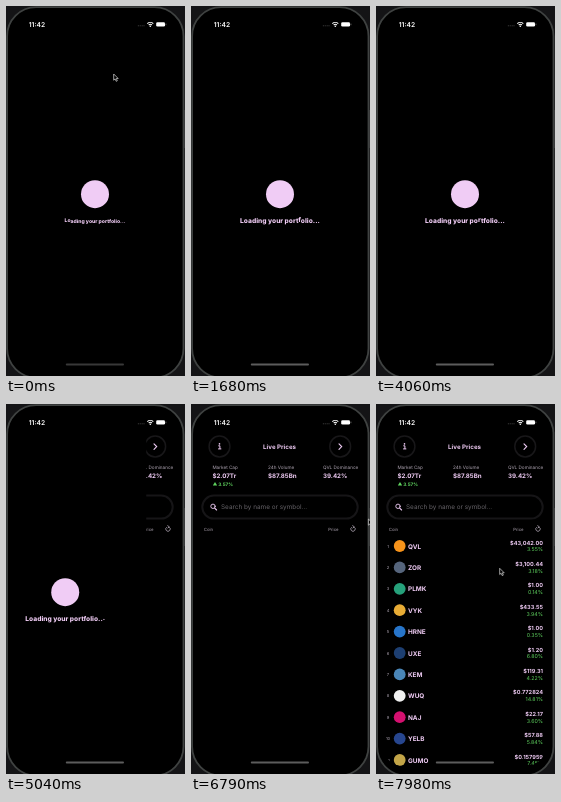
These frames come from a looping animation (179 px wide and 370 px high, 8 s). An HTML page:

```html
<!DOCTYPE html>
<html lang="en">
<head>
<meta charset="utf-8">
<title>Live Prices</title>
<style>
  html, body { margin: 0; width: 100%; height: 100%; overflow: hidden; background: #000; }
  svg { display: block; width: 100vw; height: 100vh; }
  text { font-family: Inter, "Open Sans", sans-serif; text-rendering: geometricPrecision; }
</style>
</head>
<body>
<svg id="stage" viewBox="0 0 179 370" xmlns="http://www.w3.org/2000/svg"></svg>
<script>
const LOOP = 8000;
const ACCENT = '#f0ccf5', GREY = '#b0a6b4', GREEN = '#5fd35f';
const SCREEN = { x: 7, right: 170, bottom: 362 };

// Loading wave: one letter lifts per step, two passes, then the cover slides away
const MESSAGE = 'Loading your portfolio...';
const WAVE_START = -224, STEP = 104, LIFT = 2.2;
const SLIDE_START = WAVE_START + 2 * MESSAGE.length * STEP;
const ROWS_AT = 7300, ICONS_AT = 7840, ICON_GAP = 70;

const COINS = [
  ['QVL', '$43,042.00', '3.55%', '#f7931a'],
  ['ZOR', '$3,100.44', '3.18%', '#56657c'],
  ['PLMK', '$1.00', '0.14%', '#26a17b'],
  ['VYK', '$433.55', '3.94%', '#e8ac35'],
  ['HRNE', '$1.00', '0.35%', '#2775ca'],
  ['UXE', '$1.20', '6.80%', '#1d3f72'],
  ['KEM', '$119.31', '4.22%', '#4a86b8'],
  ['WUQ', '$0.772824', '14.81%', '#f0f0f0'],
  ['NAJ', '$22.17', '3.60%', '#d4106f'],
  ['YELB', '$57.88', '5.84%', '#27468f'],
  ['GUMO', '$0.157959', '7.45%', '#c3a548']
];

const label = (x, y, size, str, fill, weight = 400, anchor = 'start', id = '') =>
  `<text ${id && `id="${id}"`} x="${x}" y="${y}" font-size="${size}" fill="${fill}"
    font-weight="${weight}" text-anchor="${anchor}">${str}</text>`;

const stat = (x, title, value) =>
  label(x, 65.2, 4.65, title, GREY) + label(x, 74.4, 6.2, value, ACCENT, 700);

const ring = (x, y) =>
  `<circle cx="${x}" cy="${y}" r="10.4" fill="#000" stroke="#181719" stroke-width="1.5"/>`;

const row = ([name, price, change, color], i) => {
  const y = 142 + 21.4 * i;
  return label(12, y + 1.5, 4.1, i + 1, GREY, 400, 'middle')
    + `<circle class="icon" cx="23.7" cy="${y}" r="5.9" fill="${color}"/>`
    + label(32, y + 2.5, 6.4, name, ACCENT, 700)
    + label(167, y - 1.4, 5.6, price, ACCENT, 700, 'end')
    + label(167, y + 5.4, 5.3, change, GREEN, 400, 'end');
};

const phone = `
  <rect width="179" height="370" fill="#141416"/>
  <path d="M178.6 104V142" stroke="#3a3a3a"/>
  <rect x="1.1" y="1.2" width="176.4" height="370.4" rx="29" fill="#000" stroke="#3f4241" stroke-width="1.8"/>`;

const home = `
  ${ring(28.5, 42.5)}
  <path d="M27.3 41.8H28.9V44.8M27.1 44.9H30.3" fill="none" stroke="${ACCENT}" stroke-width="1"/>
  <circle cx="28.5" cy="39.9" r=".8" fill="${ACCENT}"/>
  ${label(88.6, 45, 6.2, 'Live Prices', ACCENT, 700, 'middle')}
  ${ring(149.2, 42.5)}
  <path d="M148 39.8L150.7 42.6L148 45.4" fill="none" stroke="${ACCENT}" stroke-width="1.1" stroke-linecap="round"/>
  ${stat(21.4, 'Market Cap', '$2.07Tr')}
  ${stat(77, '24h Volume', '$87.85Bn')}
  ${stat(132, 'QVL Dominance', '39.42%')}
  <path d="M21.8 81.6L24 77.9L26.2 81.6Z" fill="${GREEN}"/>
  ${label(27.2, 81.7, 4.7, '3.57%', GREEN, 700)}
  <rect x="11.3" y="91.6" width="155.4" height="23" rx="11.5" fill="#000" stroke="#161517" stroke-width="2"/>
  <g fill="none" stroke="${ACCENT}" stroke-linecap="round">
    <circle cx="22" cy="102.3" r="2.2" stroke-width=".9"/>
    <path d="M23.7 104.1L25.6 106" stroke-width="1.1"/>
  </g>
  ${label(30, 105.3, 6.4, 'Search by name or symbol...', '#666368')}
  ${label(12.8, 126.6, 4.3, 'Coin', GREY)}
  ${label(137.2, 126.6, 4.3, 'Price', GREY)}
  <path d="M160.8 123.2A2.2 2.2 0 1 0 163.2 123.2M161.3 121.5L163.3 122.8L161.6 124.3"
    fill="none" stroke="${GREY}" stroke-width=".8"/>
  <g id="rows">${COINS.map(row).join('')}</g>`;

const cover = `
  <rect x="${SCREEN.x}" y="28" width="${SCREEN.right - SCREEN.x}" height="326" fill="#000"/>
  <circle cx="89" cy="188.2" r="14" fill="${ACCENT}"/>
  <g id="message">${label(89, 217.3, 6.65, MESSAGE, ACCENT, 800, 'middle', 'wave')}</g>`;

const statusBar = `
  ${label(22.8, 20.8, 6.7, '11:42', '#fff', 600)}
  ${[132.3, 134.2, 136.1, 138].map(x => `<circle cx="${x}" cy="19.8" r=".5" fill="#555"/>`).join('')}
  <g fill="none" stroke="#fff" stroke-width="1.1">
    <path d="M141.3 17.7A4.3 4.3 0 0 1 147.3 17.7M142.7 19A2.4 2.4 0 0 1 145.9 19"/>
  </g>
  <circle cx="144.3" cy="20.3" r=".8" fill="#fff"/>
  <rect x="150.2" y="16.2" width="8.8" height="4.4" rx="1.3" fill="#fff"/>
  <path d="M159.9 17.6V19.2" stroke="#888" stroke-width=".7"/>`;

const pointer = `
  <path id="pointer" d="M0 0V6.2L1.4 4.9L2.5 7.3L3.6 6.8L2.6 4.5H4.5Z"
    fill="#000" stroke="#ddd" stroke-width=".7" stroke-linejoin="round"/>`;

const $ = id => document.getElementById(id);
$('stage').innerHTML = `
  <clipPath id="screen"><rect x="${SCREEN.x}" y="0" width="${SCREEN.right - SCREEN.x}" height="${SCREEN.bottom}" rx="20"/></clipPath>
  ${phone}
  <g clip-path="url(#screen)">${home}<g id="cover">${cover}</g></g>
  ${statusBar}
  <rect id="bar" x="59.8" y="357.6" width="58.2" height="1.9" rx=".95"/>
  ${pointer}`;
const icons = [...document.querySelectorAll('.icon')];

const clamp = v => Math.max(0, Math.min(1, v));
const ease = v => v * v * (3 - 2 * v);
const show = (el, on) => el.setAttribute('visibility', on ? 'inherit' : 'hidden');

// Step response of a damped spring, ms in, 0 to 1 out
function spring(ms) {
  if (ms <= 0) return 0;
  const t = ms / 1000, w = 2 * Math.PI / 0.55, z = 0.825;
  const wd = w * Math.sqrt(1 - z * z);
  return 1 - Math.exp(-z * w * t) * (Math.cos(wd * t) + z * w / wd * Math.sin(wd * t));
}

function lift(t, i) {
  let y = 0;
  for (const pass of [0, 1]) {
    const age = t - WAVE_START - STEP * (pass * MESSAGE.length + i);
    y += spring(age) - spring(age - STEP);
  }
  return -LIFT * y;
}

// Points are [ms, x, y]
const PATHS = [
  [[0, 107.7, 68], [840, 124, 65.6], [1330, 161, 70]],
  [[6790, 177.4, 115], [7560, 123.7, 164.3], [LOOP, 123.7, 164.3]]
];

function pointerAt(t) {
  const path = PATHS.find(p => t >= p[0][0] && t <= p[p.length - 1][0]);
  if (!path) return null;
  const k = path.findIndex((p, i) => i > 0 && t <= p[0]);
  const [a, b] = [path[k - 1], path[k]];
  const f = ease(clamp((t - a[0]) / (b[0] - a[0])));
  return [a[1] + (b[1] - a[1]) * f, a[2] + (b[2] - a[2]) * f];
}

function draw(t) {
  const scale = 0.76 + 0.24 * clamp(t / 60);
  // The tiny turn keeps letters from snapping to whole pixels
  $('message').setAttribute('transform',
    `translate(89 215) rotate(.02) scale(${scale}) translate(-89 -215)`);
  const lifts = [...MESSAGE].map((c, i) => lift(t, i));
  $('wave').setAttribute('dy', lifts.map((y, i) => (y - (lifts[i - 1] || 0)).toFixed(3)).join(' '));

  const slide = spring(t - SLIDE_START);
  $('cover').setAttribute('transform', `translate(${-slide * (SCREEN.right - SCREEN.x)} 0)`);
  show($('cover'), t < SLIDE_START + 430);

  show($('rows'), t >= ROWS_AT);
  icons.forEach((el, i) => show(el, t >= ROWS_AT && t >= ICONS_AT + (i % 3) * ICON_GAP));

  const grey = Math.round(56 + 36 * clamp(t / 500));
  $('bar').setAttribute('fill', `rgb(${grey},${grey},${grey})`);

  const at = pointerAt(t);
  show($('pointer'), at);
  if (at) $('pointer').setAttribute('transform', `translate(${at[0]} ${at[1]})`);
}

function tick() {
  draw(performance.now() % LOOP);
  requestAnimationFrame(tick);
}
tick();
</script>
</body>
</html>
```
